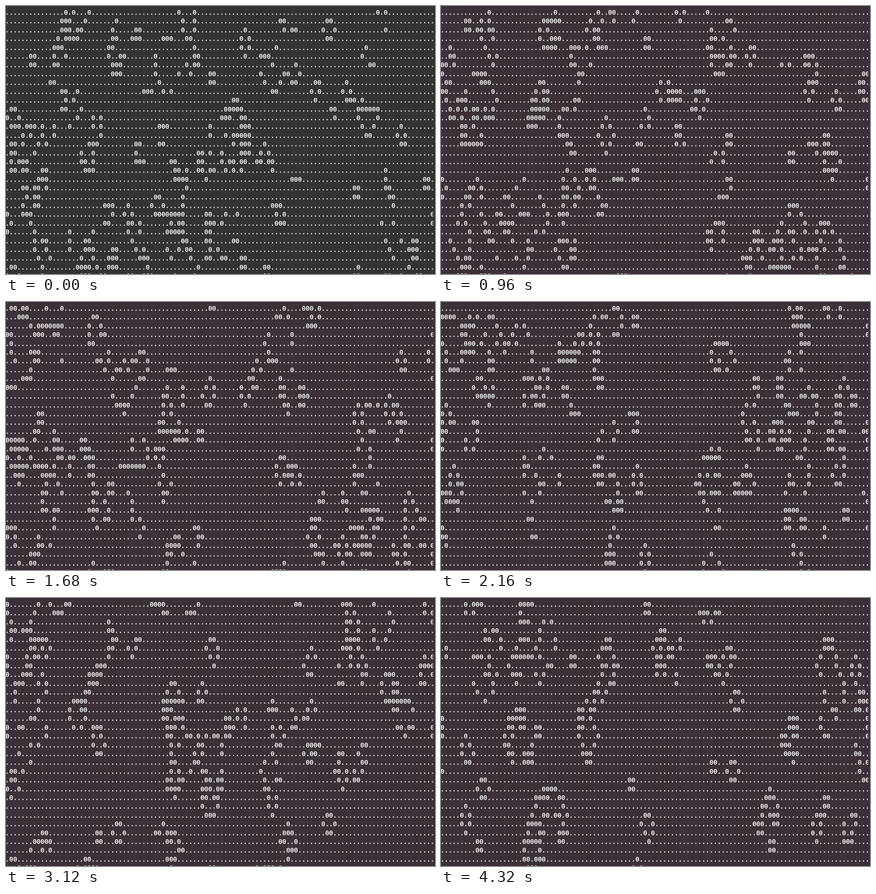
An HTML page with a canvas for the animation above (4.4 s loop, 946 by 592 pixels).

```html
<!DOCTYPE html>
<html lang="en">
<head>
<meta charset="utf-8">
<title>Game of Life in a terminal</title>
<style>
html, body { margin: 0; width: 946px; height: 592px; overflow: hidden; background: #333; }
canvas { display: block; }
</style>
</head>
<body>
<canvas id="screen" width="946" height="592"></canvas>
<script>
const LOOP = 4400, TICK = 80, WARM_AT = 720;
const COLS = 110, ROWS = 50, VIEW = 31;
const CELL_W = 8.6, CELL_H = 19.41, MID_X = 3, BASE_Y = 19, CLIP_W = 942;
const WARM_UP = 25, LINES_PER_STEP = ROWS + 13;
const TORN_STEP = 1, TORN_ROW = 7;

// Redraws come in bursts, with pauses in between: [first, last] in ms.
const BURSTS = [[0, 80], [400, 400], [560, 1200], [1360, 1680], [2160, 3760], [4240, 4320]];
const times = BURSTS.flatMap(([from, to]) =>
  Array.from({ length: (to - from) / TICK + 1 }, (_, i) => from + i * TICK));

function randomSource(seed) {
  return () => {
    seed = (seed * 1664525 + 1013904223) >>> 0;
    return seed / 4294967296;
  };
}

function nextBoard(board) {
  return board.map((row, y) => {
    const up = board[(y + ROWS - 1) % ROWS], down = board[(y + 1) % ROWS];
    return row.map((alive, x) => {
      const l = (x + COLS - 1) % COLS, r = (x + 1) % COLS;
      const near = up[l] + up[x] + up[r] + row[l] + row[r] + down[l] + down[x] + down[r];
      return near === 3 || (alive && near === 2) ? 1 : 0;
    });
  });
}

const random = randomSource(20417);
let board = Array.from({ length: ROWS }, () =>
  Array.from({ length: COLS }, () => random() < 0.32 ? 1 : 0));
for (let i = 0; i < WARM_UP; i++) board = nextBoard(board);

const boards = [board];
const lastLine = (times.length - 1) * LINES_PER_STEP + VIEW;
while (boards.length * ROWS < lastLine) boards.push(nextBoard(boards[boards.length - 1]));

const ctx = document.getElementById('screen').getContext('2d');

function draw(step, background) {
  ctx.fillStyle = background;
  ctx.fillRect(0, 0, 946, 592);
  ctx.save();
  ctx.beginPath();
  ctx.rect(0, 0, CLIP_W, 592);
  ctx.clip();
  ctx.font = '14.285px "DejaVu Sans Mono", monospace';
  ctx.textAlign = 'center';
  ctx.textBaseline = 'alphabetic';
  ctx.fillStyle = ctx.strokeStyle = '#fff';
  ctx.lineWidth = 0.4;
  for (let r = 0; r < VIEW; r++) {
    // Boards are printed one below the other; the view shows a slice of that output.
    const shown = step === TORN_STEP && r < TORN_ROW ? step - 1 : step;
    const line = shown * LINES_PER_STEP + r;
    const cells = boards[Math.floor(line / ROWS)][line % ROWS];
    const y = BASE_Y + r * CELL_H;
    cells.forEach((alive, c) => {
      const glyph = alive ? '0' : '.', x = MID_X + c * CELL_W;
      ctx.fillText(glyph, x, y);
      ctx.strokeText(glyph, x, y);
    });
  }
  ctx.restore();
}

let drawn = '';
function frame() {
  const t = performance.now() % LOOP;
  const step = times.filter(at => at <= t).length - 1;
  const background = t < WARM_AT ? '#333333' : '#3b3239';
  const key = step + background;
  if (key !== drawn) draw(step, background);
  drawn = key;
  requestAnimationFrame(frame);
}
frame();
</script>
</body>
</html>
```
